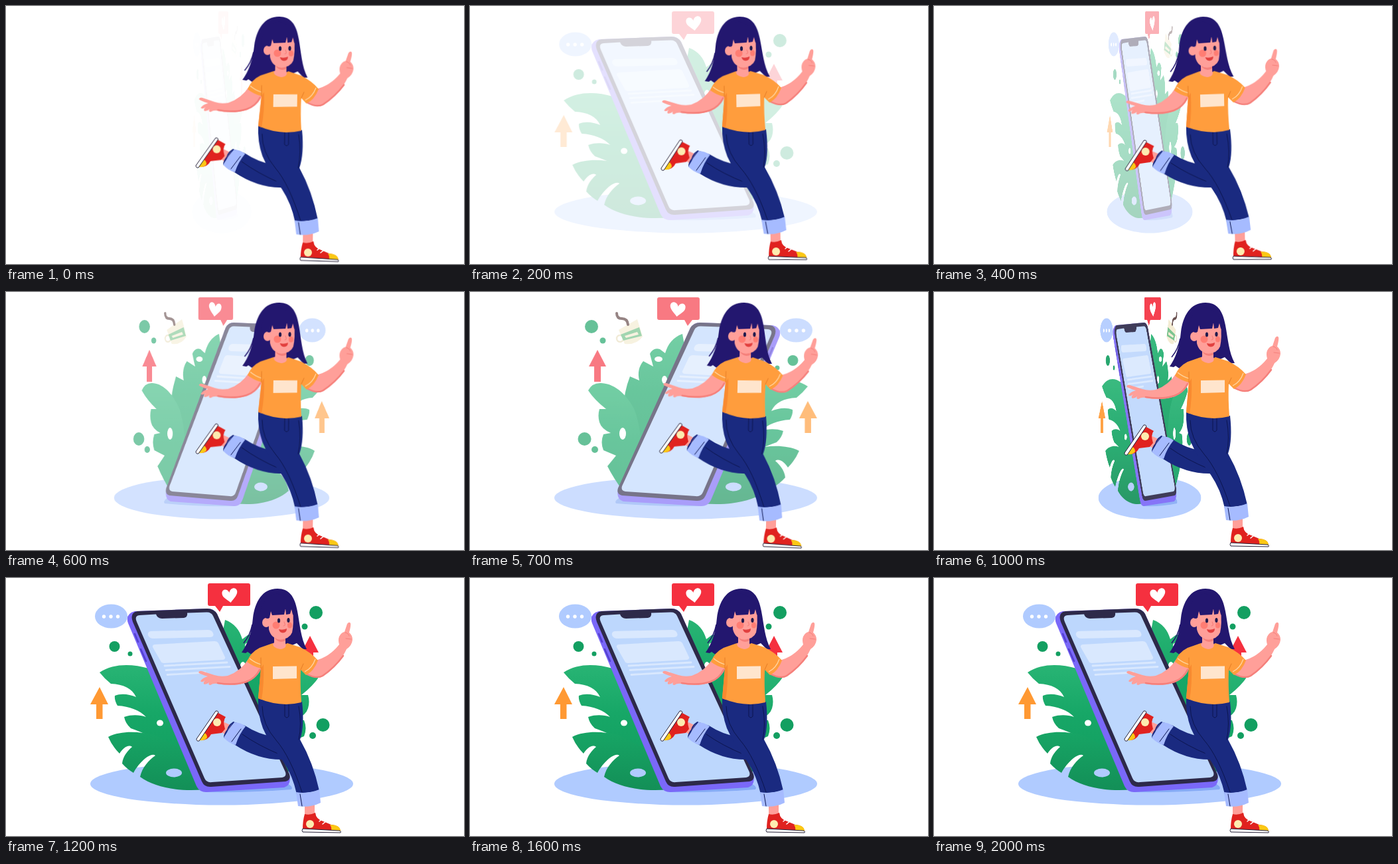
Recreate the animation shown at these times as an HTML page. Size 690x388 px, loop 2200 ms.

```html
<!DOCTYPE html>
<html lang="en">
<head>
<meta charset="utf-8">
<title>Girl and spinning phone</title>
<style>
  html, body { margin: 0; width: 100%; height: 100%; overflow: hidden; background: #fff; }
  #stage { position: relative; width: 100%; height: 100%; overflow: clip; contain: strict; }
  svg { position: absolute; left: 0; top: 0; width: 690px; height: 388px; }

  #scene {
    transform-origin: 325px 194px;
    animation: turn 2200ms infinite, fade 2200ms infinite;
  }
  #girl {
    transform-origin: 412px 185px;
    animation: sway 2200ms step-end infinite;
  }

  @keyframes turn {
    0% { transform: rotateY(437deg); animation-timing-function: steps(12); }
    54.544% { transform: rotateY(-7deg); animation-timing-function: step-end; }
    54.545%, 100% { transform: none; }
  }
  @keyframes fade {
    0% { opacity: .03; animation-timing-function: steps(11); }
    50%, 100% { opacity: 1; }
  }
  /* one sine swing, then rest */
  @keyframes sway {
    0% { transform: rotate(.95deg); }
    4.545% { transform: none; }
    9.09% { transform: rotate(-.95deg); }
    13.636% { transform: rotate(-1.4deg); }
    18.181% { transform: rotate(-1.2deg); }
    22.727% { transform: none; }
    27.272% { transform: rotate(.95deg); }
    31.818% { transform: rotate(1.4deg); }
    36.363% { transform: rotate(.95deg); }
    40.909%, 100% { transform: none; }
  }

  .leaf { fill: url(#leafShade); }
  .low { fill: url(#lowShade); }
  .green { fill: #139f61; }
  .pale { fill: #b0cbff; }
  .bar { fill: #d9e8fe; }
  .hair { fill: #23176f; }
  .skin { fill: #ff9f99; }
  .shade { fill: none; stroke: #f5807b; stroke-width: 2.5; stroke-linecap: round; }
  .shirt { fill: #ff9d3d; }
  .hem { fill: none; stroke: #ffd6a3; stroke-width: 1.3; }
  .denim { fill: #1a2a80; }
  .cuff { fill: #a6bbff; }
  .seam { fill: none; stroke: #0c154f; stroke-width: 1; stroke-linecap: round; }
  .shoe { fill: #e0221f; }
  .toe { fill: #fbc814; }
  .sole { fill: #fff; stroke: #252038; stroke-width: 1; stroke-linejoin: round; }
  .badge { fill: #fdecb0; }
</style>
</head>
<body>
<div id="stage">
<svg id="scene" viewBox="0 0 690 388">
  <defs>
    <linearGradient id="leafShade" x1="0" y1="0" x2="0" y2="1">
      <stop offset="0" stop-color="#28b474"/>
      <stop offset=".5" stop-color="#17a767"/>
      <stop offset="1" stop-color="#139f61"/>
    </linearGradient>
    <linearGradient id="lowShade" x1="0" y1="0" x2="0" y2="1">
      <stop offset="0" stop-color="#17a565"/>
      <stop offset="1" stop-color="#138f57"/>
    </linearGradient>
  </defs>
  <ellipse class="pale" cx="325" cy="309.500" rx="198" ry="32"/>

  <!-- foliage -->
  <path class="leaf" d="M330 63C344 68 352 78 356 92L364 86Q374 83 379 93L374 112L389 104Q399 116 395 133L409 127Q418 150 419 175L405 235L360 190L322 120Q325 88 330 63Z"/>
  <path class="leaf" d="M472 148Q466 136 452 137C430 138 412 157 402 178C388 215 390 265 400 308L419 300Q434 280 443 262L430 246L449 238Q454 226 449 214L438 212Q452 206 455 196Q458 186 455 176L445 176Q463 162 472 148Z"/>
  <path class="leaf" d="M141 142C162 128 190 129 215 136L270 262L262 275C246 250 216 236 188 226Q180 219 178 209C190 205 202 206 211 209C202 199 186 193 168 192Q163 184 164 177C174 173 186 175 196 179C190 166 177 160 158 159Q148 151 141 142Z"/>
  <path class="low" d="M154 239C174 229 200 231 224 236L266 258L300 318C262 322 224 315 202 299C205 285 215 274 225 267C219 262 203 274 192 293Q182 287 175 279C176 268 184 259 190 254C184 249 175 257 171 264Q160 253 154 239Z"/>
  <g fill="#fff">
    <ellipse cx="232" cy="218" rx="5" ry="4.500"/>
    <ellipse cx="420" cy="213" rx="5" ry="9"/>
    <ellipse cx="366" cy="101" rx="6" ry="4"/>
    <ellipse cx="357" cy="132" rx="4" ry="6"/>
  </g>
  <ellipse class="pale" cx="253" cy="293" rx="12" ry="6.500"/>
  <g class="green">
    <circle cx="163.500" cy="103" r="8"/>
    <circle cx="187" cy="114" r="3.500"/>
    <circle cx="467" cy="52" r="10"/>
    <circle cx="450" cy="73" r="4.500"/>
    <circle cx="477.500" cy="221" r="10"/>
    <circle cx="462" cy="237" r="5"/>
  </g>

  <!-- phone -->
  <path fill="#86abf5" d="M296 319L424 309Q434 315 430 318Q370 323 300 322Z"/>
  <path fill="#7a68f8" d="M194 50L304 46Q313 46 318 54L427 298Q430 311 419 315L302 322Q291 322 287 313L184 68Q179 54 194 50Z"/>
  <path fill="#2d2949" d="M198 50L303 46Q313 46 318 54L427 295Q430 304 421 306L309 314Q299 315 295 306L191 66Q186 52 198 50Z"/>
  <path fill="#bdd7fd" d="M201 56L226 54.500Q228 61 235 61L268 60Q274 59 273 52.500L302 51.500Q309 51 312 57L421 292Q423 299 416 300L310 307Q302 308 299 301L197 66Q193 57 201 56Z"/>
  <path fill="none" stroke="#5440d0" stroke-width="2.500" stroke-linecap="round" d="M194 84L199 96M203 107L211 125"/>
  <g class="bar">
    <path d="M218 80L304 78Q310 78 312 83Q314 88 308 89L222 91Q216 91 214 86Q213 81 218 80Z"/>
    <path d="M224 100L314 95Q318 95 320 98L330 119Q331 122 327 123L238 128Q234 128 233 125L221 104Q220 101 224 100Z"/>
  </g>
  <path fill="none" stroke="#d9e8fe" stroke-width="2.800" stroke-linecap="round" d="M239 132L333 127M241 138.500L337 133.500M243 145.500L300 142"/>

  <!-- floating items -->
  <ellipse class="pale" cx="158.500" cy="57.500" rx="24.500" ry="18"/>
  <g fill="#fff">
    <circle cx="147.500" cy="58" r="2.700"/><circle cx="158" cy="58" r="2.700"/><circle cx="168.500" cy="58" r="2.700"/>
  </g>
  <path fill="#f5303f" d="M307 8H365Q368 8 368 11V39Q368 42 365 42H327L322 51L315 42H307Q304 42 304 39V11Q304 8 307 8Z"/>
  <path fill="#fff" transform="translate(337 26) rotate(-8)" d="M0 11C-7 4-12 1-11-5C-10-11-2-11 0-4C2-11 11-12 12-5C12 1 6 5 0 11Z"/>
  <path fill="#ff9933" d="M141 164L154 190H145.500V212H136V190H127Z"/>
  <path fill="#f5303f" d="M458 87L471 112H463V135H453V112H445Z"/>
  <g>
    <circle cx="424" cy="70" r="5" fill="none" stroke="#e9dfc0" stroke-width="2.500"/>
    <path fill="#f3ebd0" d="M426 57L398 41L390 67Q399 80 417 78Z"/>
    <path fill="#6fbf86" d="M423 64L395 53L391 66L419 73Z"/>
    <path fill="#f3ebd0" d="M417 66L398 60L396 64L415 69Z"/>
    <path fill="none" stroke="#5b4040" stroke-width="4" stroke-linecap="round" d="M429 32Q429 40 421 40T412 49"/>
  </g>
</svg>

<svg id="girl" viewBox="0 0 690 388">
  <!-- back hair -->
  <path class="hair" d="M409 16C386 16 375 36 372 60C370 83 364 99 355 112L361 113L364 111Q378 123 398 116L438 98L447 107H453C444 90 443 71 439 50C435 27 426 16 409 16Z"/>
  <path fill="none" stroke="#23176f" stroke-width="1.500" d="M371 70Q368 86 358 98"/>

  <!-- far leg -->
  <path class="skin" d="M327 216L342 223L335 239L324 231Z"/>
  <path class="shoe" d="M318 202L331 209Q326 215 330 227L325 233L309 235Q304 245 292 244Z"/>
  <path class="toe" d="M296 232Q303 233 303 240Q300 245 291 244Z"/>
  <path class="sole" d="M316 200Q319 199 320 202L291 245Q287 246 287 242Z"/>
  <circle class="badge" cx="318" cy="217" r="6"/>
  <path class="denim" d="M342 216L360 222Q380 235 404 239L424 258L418 273Q380 274 345 251L328 240Z"/>
  <path class="cuff" d="M344 217Q353 217 361 223Q351 235 346 251Q336 249 328 240Q335 227 344 217Z"/>
  <path class="denim" d="M344 216Q338 220 333 232L328 240Q328 234 333 228Q336 218 344 216Z"/>
  <path class="seam" d="M354 227L340 246M356 235Q380 252 414 266"/>

  <!-- near leg -->
  <path class="skin" d="M450 341H465V356H450Z"/>
  <path class="shoe" d="M450 355Q458 357 466 353Q467 363 478 366L490 371Q503 372 504 380L447 378Q447 365 450 355Z"/>
  <path class="toe" d="M488 371Q503 371 504 380H490Q491 375 488 371Z"/>
  <path fill="none" stroke="#fff" stroke-width="1.600" stroke-linecap="round" d="M472 366L477 362M477 370L482 366"/>
  <path class="sole" d="M447 377L503 380Q505 381 504 383L447 382Q445 380 447 377Z"/>
  <circle class="badge" cx="458" cy="370" r="6"/>
  <path class="denim" d="M380 180L446 186Q450 222 443 243Q463 278 472 320L438 325Q432 297 417 275Q398 251 387 226Q379 205 380 180Z"/>
  <path class="cuff" d="M437 322Q455 325 472 318L474 338Q458 346 440 343Z"/>
  <path class="seam" d="M420 190V208Q423 212 426 208V190M386 193Q386 220 407 244T446 322M441 193Q446 220 441 243M443 325L446 343"/>

  <!-- arms -->
  <path class="skin" d="M365 122Q354 140 334 147Q323 149 314 146L295 140Q291 139 290 142Q291 144 304 148Q296 150 293 155Q295 158 300 154Q296 158 299 160Q303 160 306 157Q304 161 308 161Q312 158 318 159Q343 164 363 157Q380 149 385 135Z"/>
  <path class="shade" d="M319 158Q344 162 362 156Q376 151 382 138"/>
  <path class="skin" d="M466 124Q487 119 502 100Q500 93 502 88Q505 82 510 81L514 69Q517 65 519 68Q520 71 517 82Q522 86 522 93Q521 102 513 107Q503 129 479 147Q470 154 450 144Z"/>
  <path class="shade" d="M508 117Q495 135 477 147Q468 152 454 145"/>
  <path class="shade" style="stroke-width:1" d="M511 82Q516 83 517 87M512 91L520 92"/>

  <!-- shirt -->
  <path class="shirt" d="M402 98Q412 105 424 98L443 104Q460 112 470 124Q464 140 452 146L444 138Q443 161 445 187Q414 195 380 181Q382 158 384 136Q372 133 363 126Q368 112 382 105Z"/>
  <path fill="#f98a30" d="M384 136L388 130Q389 160 385 183L380 181Q382 158 384 136Z"/>
  <path class="hem" d="M367 121Q374 127 384 130M466 122Q461 136 450 141"/>
  <path class="seam" style="stroke:#e57c26" d="M384 120L384 136M444 138L448 129"/>
  <path fill="#ffe5cd" d="M402 133L438 132.500V151L402 152Z"/>

  <!-- head -->
  <path class="skin" d="M404 84L421 86V98Q424 106 413 107Q402 105 402 99L404 97Z"/>
  <path fill="#f5807b" d="M405 90Q412 95 421 91V94Q412 99 405 91Z"/>
  <ellipse class="skin" cx="392" cy="67" rx="6" ry="7"/>
  <path class="skin" d="M395 47H432Q434 69 431 82Q427 92 413 92Q399 91 396 77Z"/>
  <path class="hair" d="M382 59Q384 30 408 23Q432 30 437 56L432 55L430 47L428 54L422 55L421 46L419 55L401 56L399 50L397 60L393 61Q388 57 382 61Z"/>
  <circle cx="407" cy="71" r="5.500" fill="#ff7d73"/>
  <ellipse cx="427.500" cy="71" rx="3.500" ry="4.500" fill="#ff7d73"/>
  <g fill="#201a4d">
    <ellipse cx="411" cy="64" rx="2.100" ry="3.600"/>
    <ellipse cx="425.500" cy="63.500" rx="2.100" ry="3.600"/>
  </g>
  <path class="shade" style="stroke-width:1.200" d="M419 66Q422 72 418 72"/>
  <path fill="#e2403f" d="M411 77Q417 79 423 76Q423 82 417 82.500Q412 82 411 77Z"/>
</svg>
</div>
</body>
</html>
```
